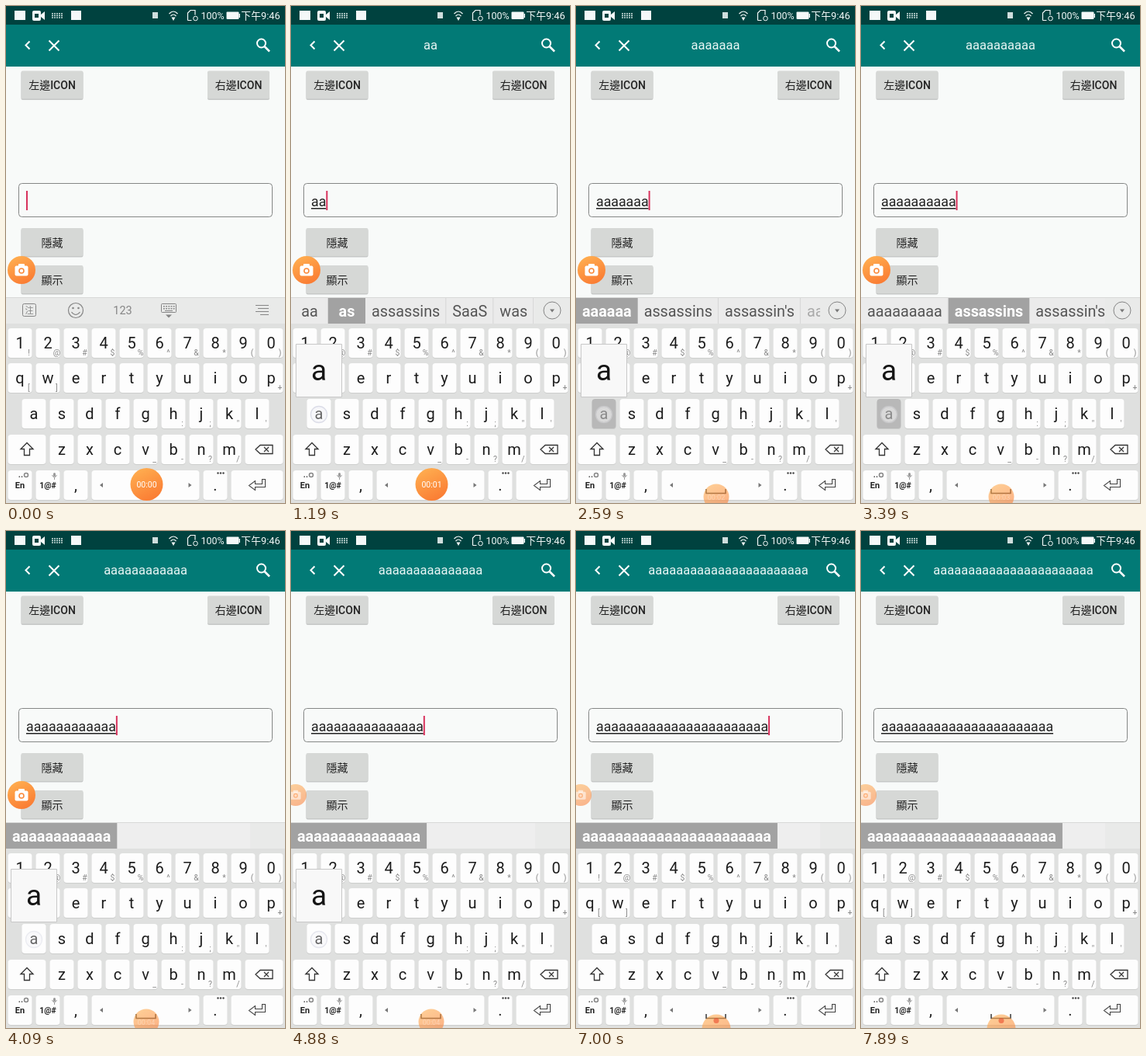
An HTML page with a canvas that plays this animation: 360x640 px, repeating every 8 s.

```html
<!DOCTYPE html>
<html lang="zh-Hant">
<head>
<meta charset="utf-8">
<style>
html, body { margin: 0; width: 360px; height: 640px; overflow: hidden; }
canvas { display: block; }
</style>
</head>
<body>
<canvas id="stage" width="360" height="640"></canvas>
<script>
const c = document.getElementById('stage').getContext('2d');
const LOOP = 8000, LETTERS = 23;
const FONT = 'Roboto, "Noto Sans CJK TC", "Noto Sans CJK", sans-serif';

function text(s, x, y, size, color = '#222', weight = 400, align = 'center') {
  c.font = `${weight} ${size}px ${FONT}`;
  c.fillStyle = color;
  c.textAlign = align;
  c.fillText(s, x, y);
}
function box(x, y, w, h, color, r = 0) {
  c.fillStyle = color;
  c.beginPath();
  c.roundRect(x, y, w, h, r);
  c.fill();
}
function frame(x, y, w, h, color, r = 0) {
  c.strokeStyle = color;
  c.lineWidth = 1;
  c.beginPath();
  c.roundRect(x, y, w, h, r);
  c.stroke();
}
function disc(x, y, r, color) {
  c.fillStyle = color;
  c.beginPath();
  c.arc(x, y, r, 0, 7);
  c.fill();
}
function ring(x, y, r, color, width = 1) {
  c.strokeStyle = color;
  c.lineWidth = width;
  c.beginPath();
  c.arc(x, y, r, 0, 7);
  c.stroke();
}
function line(d, color, width = 1) {
  c.strokeStyle = color;
  c.lineWidth = width;
  c.stroke(new Path2D(d));
}
function shape(d, color) {
  c.fillStyle = color;
  c.fill(new Path2D(d));
}

// When the nth "a" is pressed
function pressTime(n) {
  if (n < 1) return -375;
  if (n < 3) return n === 1 ? 500 : 1080;
  return n > 20 ? 6365 + (n - 21) * 120 : 590 + 275 * n;
}
function typedAt(t) {
  let n = 0;
  while (n < LETTERS && pressTime(n + 1) <= t) n++;
  return n;
}

function statusBar() {
  box(0, 0, 360, 24, '#00423f');
  const w = '#f4f8f8';
  box(11, 6, 14, 12, w);
  box(34, 6, 11, 13, w, 2);
  shape('M45 11l5-4v11l-5-4z', w);
  box(37, 10, 5, 5, '#00423f');
  for (let i = 0; i < 15; i++) box(59 + i % 5 * 3, 9 + Math.floor(i / 5) * 2.6, 2, 1.6, '#c5d8d6');
  box(84, 6, 13, 12, w);
  box(189, 8, 7, 8, '#cfdedd');
  line('M210.500 10Q216 4 221.500 10M212.500 13Q216 9 219.500 13', w, 1.2);
  shape('M213.500 14.500h5l-2.500 4.500z', w);
  line('M234.500 18.500V9l3.500-3.500h6v6M234.500 18.500h5', w, 1.2);
  ring(244.500, 16, 2.800, w);
  text('100%', 266.500, 17, 12.500, w);
  box(284.500, 7.500, 16, 9.500, w, 1);
  box(300.500, 10, 1.500, 5, w);
  text('下午9:46', 328.500, 17, 12.800, w);
}

function appBar(n) {
  box(0, 24, 360, 54, '#027a76');
  line('M30.500 45.500l-5 5 5 5M55.500 44.500l13 13m0-13l-13 13', '#fff', 2);
  ring(329.500, 48, 5.500, '#fff', 2);
  line('M333.500 52l6.500 6.500', '#fff', 2.500);
  text('a'.repeat(n), n > 20 ? 196.500 : 180, 56, 16.500, '#eaf6f5');
}

function button(label, x, y) {
  box(x, y + 1, 80, 36.500, '#c6c8c7', 2);
  box(x, y, 80, 36, '#d6d8d6', 2);
  text(label, x + 40, y + 23.500, 14, '#222', 500);
}

function form(n, t) {
  button('左邊ICON', 19.500, 83.500);
  button('右邊ICON', 260, 83.500);
  button('隱藏', 19.500, 286);
  button('顯示', 19.500, 334);
  frame(16.500, 228.500, 327, 43, '#858786', 4);
  const s = 'a'.repeat(n);
  text(s, 26, 258, 17.750, '#222', 400, 'left');
  const w = c.measureText(s).width;
  box(26, 260, w, 1.500, '#222');
  const blink = Math.floor((t - pressTime(n)) / 425) % 2;
  if (!blink) box(26 + w, 238, 2, 25, '#d8325c');
}

function toolStrip() {
  const g = '#858585';
  frame(21.500, 383.500, 17, 16, g, 2);
  text('注', 30, 396, 11, g);
  ring(90, 392, 9.500, g, 1.200);
  disc(86.500, 389, 1.300, g);
  disc(93.500, 389, 1.300, g);
  line('M84.500 394Q90 401 95.500 394', g, 1.200);
  text('123', 150.500, 396.500, 14.500, g);
  frame(200.500, 383.500, 19, 11, g, 1);
  for (let i = 0; i < 10; i++) box(203 + i % 5 * 3.200, 386 + Math.floor(i / 5) * 3, 1.800, 1.500, g);
  box(205, 392, 10, 1, g);
  shape('M206 397.500h8l-4 4z', g);
  line('M322 385.500h17M325 389.500h14M322 393.500h17M328 397.500h11', g);
}

function suggestions(n) {
  const own = 'a'.repeat(n);
  const many = n < 12;
  const words = n < 3 ? [own, 'as', 'assassins', 'SaaS', 'was']
    : many ? [own, 'assassins', "assassin's", 'aaaaaaa'] : [own];
  const chosen = n < 3 || (n > 8 && many) ? 1 : 0;
  c.save();
  c.beginPath();
  c.rect(0, 376, 315, 33);
  c.clip();
  box(0, 376, 315, 33, many ? '#ebebeb' : '#eeeeee');
  let x = 0;
  words.forEach((word, i) => {
    const on = i === chosen;
    c.font = `${on ? 700 : 400} 19.800px ${FONT}`;
    const w = Math.max(48, c.measureText(word).width + 16);
    box(x + w - 1, 376, 1, 33, '#d6d6d6');
    if (on) box(x, 376, w, 33, '#a2a2a2');
    text(word, x + w / 2, 400, 19.800, on ? '#fff' : i === 3 && n > 2 ? '#aaa' : '#555', on ? 700 : 400);
    x += w;
  });
  c.restore();
  if (many) {
    ring(337, 392, 11, '#858585');
    shape('M334 390.500h6l-3 4z', '#777');
  }
}

function key(x, y, w, label, sub, fill = '#fdfdfd') {
  box(x, y + 1, w, 38, '#cdcecd', 4);
  box(x, y, w, 38, fill, 4);
  if (label) text(label, x + w / 2, y + 26, 20, '#1c1c1c');
  if (sub && sub !== ' ') text(sub, x + w - 4, y + 35, 10.500, '#888');
}

function keyRow(x, y, labels, subs) {
  [...labels].forEach((s, i) => key(x + 36 * i, y, 31, s, subs[i]));
}

function keyboard(since) {
  box(0, 409, 360, 231, '#dfe0df');
  keyRow(2.500, 415, '1234567890', '!@#$%^&*()');
  keyRow(2.500, 460, 'qwertyuiop', '[]       +');
  keyRow(20.500, 506, 'asdfghjkl', '     :;"\'');
  keyRow(56.500, 552, 'zxcvbnm', '   _-?/');

  key(2.500, 552, 49);
  line('M27 562.500l-8 8h4.500v8h7v-8h4.500z', '#333', 1.300);
  key(308.500, 552, 49);
  line('M322 571l6-5.500h16v11h-16zM333 568l6 6m0-6l-6 6', '#333', 1.300);

  key(2.500, 598, 31);
  text('En', 18, 621, 11, '#222', 700);
  text('..', 19, 607, 11, '#444', 700);
  ring(26, 604, 2.500, '#888', 1.500);
  key(38.500, 598, 31);
  text('1@#', 54, 621, 10.500, '#222', 700);
  box(61, 601, 3, 5, '#999', 1.500);
  line('M59.500 604q3 6 6 0M62.500 607v3', '#999');
  key(74.500, 598, 31, ',');
  key(110.500, 598, 139);
  shape('M125 614v6l-4-3zM235.500 614v6l4-3z', '#777');
  line('M168 622v5.500h25V622', '#444', 1.600);
  key(254.500, 598, 31, '.');
  for (let i = 0; i < 3; i++) disc(273.500 + i * 3.500, 601.500, 1.200, '#444');
  key(290.500, 598, 67);
  line('M330.500 609.500h4v10h-13v4l-8-6 8-6v4h9z', '#444', 1.100);

  if (since < 300) touch(since);
}

function touch(since) {
  const down = since < 85;
  key(20.500, 506, 31, '', '', down ? '#b8b8b8' : '#fdfdfd');
  c.globalAlpha = down ? 0.75 : 1 - since / 300;
  disc(36, 526, 10, down ? '#e4e4e4' : '#f4f4f8');
  ring(36, 526, 10.500, down ? '#cfcfd2' : '#c9cbdc', 1.300);
  c.globalAlpha = 1;
  text('a', 36, 532, 20, down ? '#8a8a8a' : '#666');
  frame(6.500, 435.500, 59, 68, '#c8c8c8');
  box(7, 436, 58, 67, '#f8f8f8');
  text('a', 36, 482, 37, '#151515');
}

function orange(x, y, r) {
  const g = c.createLinearGradient(x - r / 2, y - r, x + r / 2, y + r);
  g.addColorStop(0, '#ffae50');
  g.addColorStop(1, '#fa7a32');
  disc(x, y, r, g);
}

function bubbles(t) {
  const clock = '00:0' + Math.floor(t / 1000);
  if (t < 2050) {
    orange(181.500, 616, 21);
    text(clock, 181.500, 620, 10.500, '#fff');
  } else {
    c.globalAlpha = 0.6;
    if (t > 5500) {
      orange(181, 641, 18.500);
      disc(181, 630.500, 3.500, '#ea4b2c');
    } else {
      orange(181, 632, 16.500);
      c.globalAlpha = 0.35;
      text(clock, 181, 635.500, 9, '#fff');
    }
    c.globalAlpha = 1;
  }

  const tucked = t > 4400;
  c.save();
  c.translate(tucked ? 6 : 20, 340);
  if (tucked) {
    c.scale(0.78, 0.78);
    c.globalAlpha = 0.55;
  }
  orange(0, 0, 18);
  box(-8.500, -5.500, 17, 13, '#fff', 2);
  box(-4, -8, 8, 4, '#fff', 1);
  disc(0, 1, 3.800, '#fb8a3b');
  disc(0, 1, 2.200, '#fff');
  c.restore();
}

function draw(t) {
  const n = typedAt(t);
  const since = n ? t - pressTime(n) : Infinity;
  // Suggestions refresh when the finger lifts
  const listed = typedAt(t - 80);
  box(0, 0, 360, 640, '#f8faf9');
  statusBar();
  appBar(n);
  form(n, t);
  box(0, 375, 360, 34, '#e9eae9');
  box(0, 375, 360, 1, '#d8d9d8');
  listed ? suggestions(listed) : toolStrip();
  keyboard(since);
  bubbles(t);
}

const start = performance.now();
function tick() {
  draw((performance.now() - start) % LOOP);
  requestAnimationFrame(tick);
}
tick();
</script>
</body>
</html>
```
